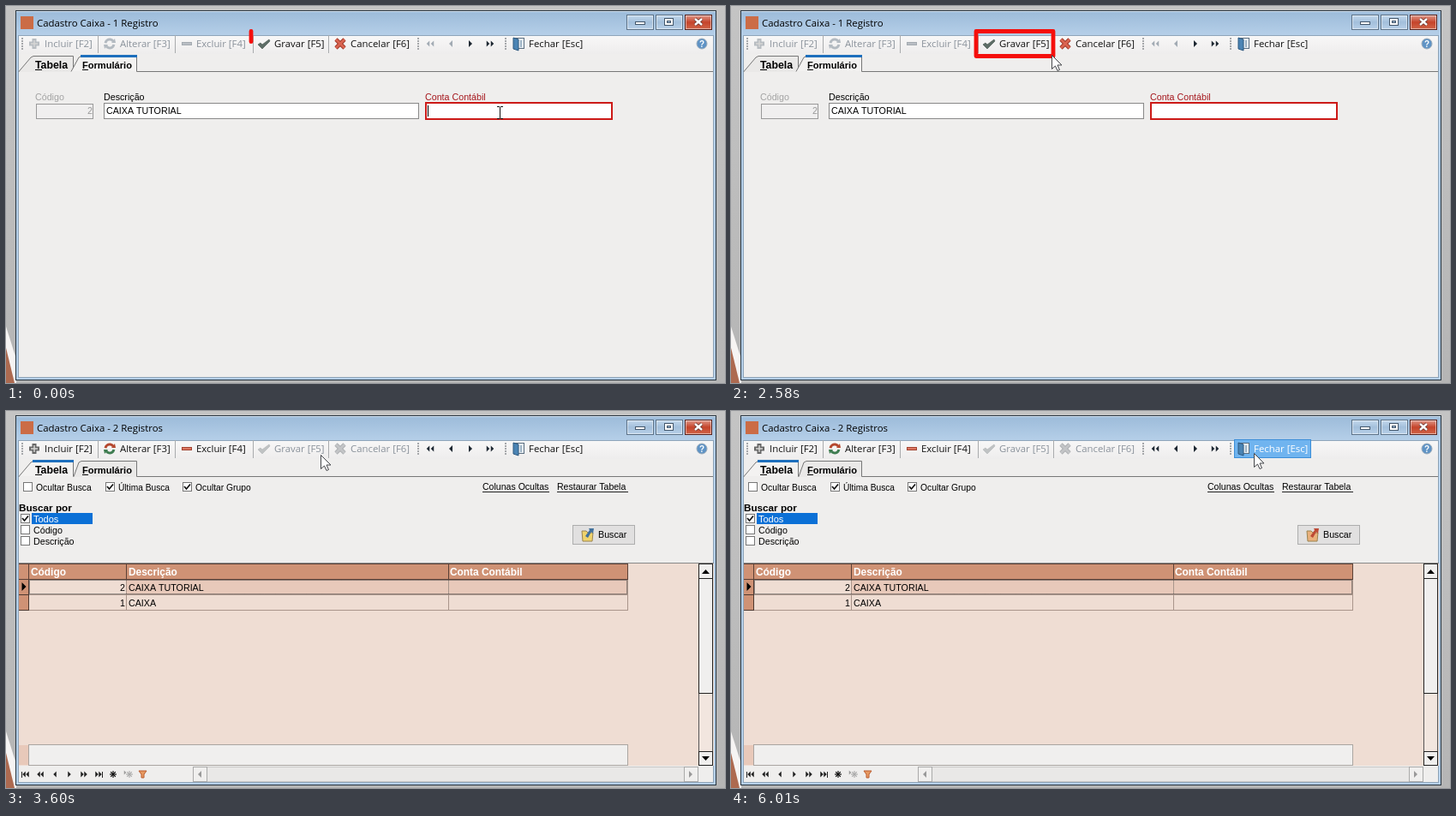
These frames come from a looping animation (839x440 px, 6210 ms). An HTML page with a canvas:

```html
<!DOCTYPE html>
<html lang="pt">
<head>
<meta charset="utf-8">
<title>Cadastro</title>
<style>
html, body { margin: 0; width: 100%; height: 100%; overflow: hidden; background: #bcbcbc; }
canvas { display: block; }
</style>
</head>
<body>
<canvas id="stage" width="839" height="440"></canvas>
<script>
const g = document.getElementById('stage').getContext('2d');
const LOOP = 6210;
const UI = '"Open Sans", sans-serif', SANS = '"Liberation Sans", Arial, sans-serif';
const PAGE = '#efeeed', INK = '#111', OFF = '#8a929b', RED = '#f50f0c', LINE = '#888';
const HEAD = '#cf9275', ROW = '#e8c9ba', PALE = '#efddd3';

// When each step of the demonstration happens, in ms
const T = { arrow: 1800, caretOff: 2440, press1: 3060, frame1Off: 3200, saved: 3390,
  grid: 3600, frame2: 3680, press2: 5730, frame2Off: 5870 };
const cursorPath = [[1730, 576, 124], [1870, 546, 115], [2290, 426, 74], [2580, 374, 57],
  [2790, 367, 51], [3750, 367, 51], [4570, 547, 42], [4930, 610, 49]];

function box(x, y, w, h, fill, stroke, line = 1) {
  if (fill) { g.fillStyle = fill; g.fillRect(x, y, w, h); }
  if (stroke) {
    g.strokeStyle = stroke; g.lineWidth = line;
    g.strokeRect(x + line / 2, y + line / 2, w - line, h - line);
  }
}
function shape(points, fill, stroke, line = 1, closed = true) {
  g.beginPath();
  points.forEach(([x, y]) => g.lineTo(x, y));
  if (closed) g.closePath();
  if (fill) { g.fillStyle = fill; g.fill(); }
  if (stroke) { g.strokeStyle = stroke; g.lineWidth = line; g.stroke(); }
}
const line = (points, color, width) => shape(points, null, color, width, false);
function disc(x, y, r, fill, stroke) {
  g.beginPath(); g.arc(x, y, r, 0, 7);
  g.fillStyle = fill; g.fill();
  if (stroke) { g.strokeStyle = stroke; g.lineWidth = 1; g.stroke(); }
}
function text(s, x, y, { color = '#000', size = 10.7, face = SANS, bold = false, align = 'left' } = {}) {
  g.font = `${bold ? 'bold ' : ''}${size}px ${face}`;
  g.textAlign = align; g.fillStyle = color;
  g.fillText(s, x, y);
}
function fade(y0, y1, ...colors) {
  const f = g.createLinearGradient(0, y0, 0, y1);
  colors.forEach((c, i) => f.addColorStop(i / (colors.length - 1), c));
  return f;
}
const tri = (x, y, dir, size, color) =>
  shape([[x - dir * size / 2, y - size], [x + dir * size / 2, y], [x - dir * size / 2, y + size]], color);

function cursorAt(t) {
  if (t <= cursorPath[0][0]) return cursorPath[0].slice(1);
  for (let i = 1; i < cursorPath.length; i++) {
    const [t0, x0, y0] = cursorPath[i - 1], [t1, x1, y1] = cursorPath[i];
    if (t < t1) {
      const k = (t - t0) / (t1 - t0);
      return [x0 + (x1 - x0) * k, y0 + (y1 - y0) * k];
    }
  }
  return cursorPath.at(-1).slice(1);
}

function drawWindow(saved) {
  box(0, 0, 839, 440, fade(0, 440, '#c4c4c4', '#b5b5b5'));
  shape([[0, 374], [12, 412], [12, 440], [0, 440]], '#f6f4f3');
  shape([[0, 399], [10, 440], [0, 440]], '#ad6a50');
  box(11, 5, 818, 432, fade(5, 34, '#9bbad9', '#b5cfe8'), '#27343f');
  box(12, 6, 816, 1, '#d5e5f4');
  box(14, 34, 812, 400, PAGE, '#8fa5ba');
  box(17, 12, 15, 15, '#cb6c46');
  text(`Cadastro Caixa - ${saved ? '2 Registros' : '1 Registro'}`, 36, 24, { face: UI, size: 11.4 });
  [[724, 32], [758, 32], [792, 32]].forEach(([x, w], i) => {
    const fill = i < 2 ? fade(10, 28, '#c8dcef', '#a3bfdb', '#bad2ea') : fade(10, 28, '#e3a294', '#c5442b', '#d2694c');
    box(x, 10, w, 18, fill, i < 2 ? '#5c7288' : '#5a221c');
    box(x + 1, 11, w - 2, 16, null, 'rgba(255,255,255,.5)');
  });
  box(734, 18, 12, 4, '#fff', '#44576b');
  box(768, 14, 11, 9, '#fff', '#44576b');
  box(771, 17, 5, 3, '#9db9d6', '#44576b');
  for (const [c, w] of [['#61302a', 4], ['#fff', 2.4]]) {
    line([[804, 15], [812, 22]], c, w);
    line([[812, 15], [804, 22]], c, w);
  }
}

const icons = {
  plus(x, y, on) {
    const c = on ? '#686868' : '#b7bcc1';
    line([[x - 6, y], [x + 6, y]], c, 5); line([[x, y - 6], [x, y + 6]], c, 5);
    line([[x - 4, y], [x + 4, y]], '#d6d6d4', 1.5); line([[x, y - 4], [x, y + 4]], '#d6d6d4', 1.5);
  },
  cycle(x, y, on) {
    for (const [a, c, d] of [[3.3, on ? '#b5482f' : '#b3bac1', 1], [0.2, on ? '#3f7d51' : '#b3bac1', -1]]) {
      g.beginPath(); g.arc(x, y, 5, a, a + 2.4);
      g.strokeStyle = c; g.lineWidth = 3; g.stroke();
      shape([[x + d * 2, y - d * 1], [x + d * 7, y - d * 1], [x + d * 6, y - d * 6]], c);
    }
  },
  minus(x, y, on) { box(x - 6, y - 2, 12, 4, on ? '#dc7762' : '#b9bec4', on ? '#a34431' : '#a5abb1'); },
  check(x, y, on) {
    shape([[x - 7, y + 1], [x - 4, y - 1], [x - 2, y + 1], [x + 6, y - 5], [x + 7, y - 3], [x - 2, y + 6]],
      on ? '#5d6d66' : '#bfc2c3', on ? '#48564f' : '#b4b7b9', .6);
  },
  cross(x, y, on) {
    for (const [c, w] of [[on ? '#a03a2b' : '#adb0b3', 4.6], [on ? '#db6450' : '#c3c5c7', 2.6]]) {
      line([[x - 5, y - 5], [x + 5, y + 5]], c, w);
      line([[x + 5, y - 5], [x - 5, y + 5]], c, w);
    }
  },
  door(x, y) {
    box(x - 6, y - 7, 13, 13, '#e7edf2', '#5b6e80');
    shape([[x - 6, y - 7], [x, y - 5], [x, y + 8], [x - 6, y + 6]], '#4b84b4', '#2d587f');
    box(x + 2, y - 4, 2, 8, '#9fb5c7');
  }
};
const buttons = [
  // label, icon, icon x, text x, left, right
  ['Incluir [F2]', 'plus', 33, 45, 24, 104], ['Alterar [F3]', 'cycle', 121, 133, 110, 194],
  ['Excluir [F4]', 'minus', 211, 222, 200, 285], ['Gravar [F5]', 'check', 301, 313, 290, 375],
  ['Cancelar [F6]', 'cross', 390, 402, 379, 475], ['Fechar [Esc]', 'door', 598, 610, 587, 677]
];
const arrows = [[495, -1, 2], [519, -1, 1], [542, 1, 1], [565, 1, 2]];

function drawToolbar(t, saved, [cx, cy]) {
  box(15, 35, 810, 21, fade(34, 56, '#f8f8f8', '#eeeded'));
  const hover = (l, r) => t > T.arrow && cy >= 33 && cy < 56 && cx >= l && cx < r;
  const glow = (l, r, pressed) =>
    box(l, 33, r - l, 22, pressed ? '#70b4ef' : '#b5d8f5', pressed ? '#3b8ed8' : '#5a9fd9');
  for (const x of [19, 481, 583])
    for (let y = 37; y < 52; y += 3) box(x - 1, y, 2, 2, '#a5a7aa');
  for (const x of [107, 197, 288, 376]) box(x, 34, 1, 21, '#a9abad');
  buttons.forEach(([label, icon, ix, tx, l, r], i) => {
    const on = i === 5 || (i < 3) === saved;
    const lit = on && hover(l, r);
    const pressed = lit && t >= (i === 5 ? T.press2 : T.press1);
    if (lit) glow(l, r, pressed);
    icons[icon](ix, 44, on);
    text(label, tx, 48, { face: UI, size: 11.4, color: pressed ? '#fff' : on ? INK : OFF });
  });
  arrows.forEach(([x, dir, count], i) => {
    const on = i > 1 || t >= T.grid;
    if (on && hover(x - 11, x + 12)) glow(x - 11, x + 12);
    for (let k = 0; k < count; k++)
      tri(x + (count > 1 ? k * 5 - 2.5 : 0), 44, dir, count > 1 ? 3.5 : 4, on ? '#1c2630' : '#a2abb4');
  });
  disc(812, 44, 6, '#5f93c5', '#9aabba');
  text('?', 812, 48, { bold: true, size: 10, color: '#fff', align: 'center' });
}

function drawTabs(table) {
  line([[15, 76.5], [825, 76.5]], '#777', 1);
  const tab = (x0, x1, x2, active) => {
    const edge = [[x0, 77], [x1 - 3, 60], [x1, 58.5], [x2 + .5, 58.5], [x2 + .5, 77]];
    shape(edge, active ? '#f3f2f1' : '#eae9e8');
    line(edge.map(([x, y]) => [x, Math.min(y, 76.5)]), '#777', 1);
    if (active) {
      box(x0 + 1, 76, x2 - x0 - 1, 1, PAGE);
      box(x1 - 1, 57, x2 - x1 + 2, 3, '#1d6fbd');
    }
  };
  const first = () => tab(15, 32, 78, table), second = () => tab(table ? 79 : 76, 88, 152, !table);
  table ? (second(), first()) : (first(), second());
  text('Tabela', 34, 73, { bold: true, size: 12.3 });
  text('Formulário', 89, 73, { bold: true, size: 11.1 });
  box(34, 74, 8, 1, '#000');
  box(89, 74, 7, 1, '#000');
}

function drawForm(t) {
  text('Código', 34, 110, { color: '#a3a3a3' });
  box(35, 114, 67, 18, '#f0efef', '#999');
  text('2', 101, 126, { color: '#999', align: 'right' });
  text('Descrição', 114, 110);
  box(114, 113, 368, 19, '#fff', LINE);
  text('CAIXA TUTORIAL', 117, 126);
  text('Conta Contábil', 489, 110, { color: '#a5161c' });
  box(489, 112, 219, 21, '#fff', '#cc1a17', 2);
  if (t < T.caretOff) box(492, 116, 1, 13, '#000');
}

function checkbox(label, x, y, checked, size = 10.7, color) {
  box(x, y, 11, 11, '#fff', '#777');
  if (checked) line([[x + 2, y + 5], [x + 4.5, y + 8], [x + 9, y + 2.5]], '#111', 1.7);
  text(label, x + 15, y + 10, { size, color });
}
function link(label, x, width) {
  text(label, x, 92, { size: 10.55 });
  box(x, 94, width, 1, '#222');
}
function drawSearch(t) {
  checkbox('Ocultar Busca', 20, 83, false, 10.3);
  checkbox('Última Busca', 116, 83, true, 10.2);
  checkbox('Ocultar Grupo', 206, 83, true, 10.3);
  link('Colunas Ocultas', 556, 78);
  link('Restaurar Tabela', 643, 83);
  text('Buscar por', 15, 117, { bold: true, size: 11.7 });
  box(30, 119, 71, 13, '#0b70d6');
  checkbox('Todos', 17, 120, true, 11, '#fff');
  checkbox('Código', 17, 133);
  checkbox('Descrição', 17, 146);
  box(661, 133, 73, 23, '#e1e0e0', '#adadad');
  const warm = t > 3750;
  shape([[672, 140], [677, 140], [679, 142], [685, 142], [684, 152], [673, 152]], warm ? '#e9b07c' : '#efd36c', '#9a8450');
  shape([[676, 146], [681, 139], [680, 137], [686, 137], [685, 143], [683, 141], [679, 148]], warm ? '#bd4a35' : '#41719c');
  text('Buscar', 691, 148);
  box(15, 177, 811, 1, LINE);
}

function drawGrid() {
  box(15, 178, 811, 236, PALE);
  box(15, 179, 711, 17, HEAD);
  box(15, 197, 12, 35, HEAD);
  box(140, 197, 585, 17, ROW);
  box(15, 178, 711, 1, '#5b4036');
  box(15, 196, 711, 1, '#5b4036');
  for (const x of [26, 140, 516, 725]) {
    box(x, 179, 1, 18, '#5b4036');
    box(x, 197, 1, 36, '#a9958b');
  }
  for (const y of [214, 232]) {
    box(27, y, 699, 1, '#a9958b');
    box(15, y, 12, 1, '#4c3830');
  }
  box(26, 197, 1, 36, '#4c3830');
  g.setLineDash([1, 1]);
  box(27, 197, 698, 17, null, '#333');
  g.setLineDash([]);
  const head = { bold: true, size: 11.9, color: '#fff' };
  text('Código', 29, 192, head);
  text('Descrição', 143, 192, head);
  text('Conta Contábil', 518, 192, head);
  tri(21, 205, 1, 5, '#000');
  [['2', 'CAIXA TUTORIAL', 210], ['1', 'CAIXA', 228]].forEach(([code, name, y]) => {
    text(code, 139, y, { align: 'right' });
    text(name, 143, y);
  });

  box(15, 390, 12, 23, ROW);
  box(26, 389, 700, 25, '#f0efee', '#aaa5a1');

  box(808, 178, 17, 236, '#f2e6df', '#555');
  box(808, 178, 17, 18, '#f0efee', '#222');
  box(808, 195, 17, 135, '#f0efee', '#222');
  box(808, 397, 17, 17, '#f0efee', '#222');
  shape([[812, 190], [816.5, 185], [821, 190]], '#000');
  shape([[812, 403], [821, 403], [816.5, 408]], '#000');

  box(15, 414, 810, 19, PAGE);
  const ink = '#222';
  for (const [x, dir, count] of [[23, -1, 2], [40, -1, 2], [57, -1, 1], [74, 1, 1], [91, 1, 2], [108, 1, 2]])
    for (let k = 0; k < count; k++) tri(x + (count > 1 ? k * 4 - 2 : 0), 424, dir, 3.5, ink);
  box(18, 421, 1, 7, ink);
  box(112, 421, 1, 7, ink);
  const star = (x, c) => [0, 1, 2, 3].forEach(i => {
    const a = i * Math.PI / 4, dx = 4 * Math.cos(a), dy = 4 * Math.sin(a);
    line([[x - dx, 424 - dy], [x + dx, 424 + dy]], c, 1.1);
  });
  star(125, '#000');
  star(144, '#aaa');
  tri(139, 422, 1, 2.5, '#999');
  shape([[155, 420], [164, 420], [161, 424], [161, 428], [158, 428], [158, 424]], '#e79a62', '#bb5a2c');
  box(218, 415, 590, 18, '#e9e8e7', '#c9c8c7');
  box(218, 415, 17, 18, '#f0efee', '#aaa');
  box(791, 415, 17, 18, '#f0efee', '#aaa');
  tri(226, 424, -1, 4, '#999');
  tri(799, 424, 1, 4, '#999');
}

// Red frame drawn from the top left corner: down, right, up and back
function drawFrame(x, y, w, h, length) {
  g.lineJoin = g.lineCap = 'round';
  g.setLineDash([Math.max(0, length), 999]);
  shape([[x, y], [x, y + h], [x + w, y + h], [x + w, y]], null, RED, 4.8);
  g.setLineDash([]);
  g.lineJoin = 'miter';
  g.lineCap = 'butt';
}

function drawCursor(t, [x, y]) {
  if (t < T.arrow) {
    box(x, y - 6, 1, 13, '#111');
    for (const dy of [-7, 7]) {
      box(x - 3, y + dy, 3, 1, '#111');
      box(x + 1, y + dy, 3, 1, '#111');
    }
    return;
  }
  const outline = [[0, 0], [0, 16], [4, 12.5], [6.5, 18], [9, 17], [6.5, 11.5], [11.5, 11.5]];
  shape(outline.map(([dx, dy]) => [x + dx + .5, y + dy + .5]), '#fff', '#45474b', 1);
}

function draw(t) {
  const saved = t >= T.saved, cursor = cursorAt(t);
  drawWindow(saved);
  drawToolbar(t, saved, cursor);
  drawTabs(saved);
  if (saved) drawSearch(t); else drawForm(t);
  if (t >= T.grid) drawGrid();
  if (t < T.frame1Off) drawFrame(286, 29.5, 90, 29, 12 + .212 * t);
  if (t >= T.frame2 && t < T.frame2Off) drawFrame(583.5, 30, 97, 29, .225 * (t - 3650));
  drawCursor(t, cursor);
}

const start = performance.now();
function tick() {
  draw((performance.now() - start) % LOOP);
  requestAnimationFrame(tick);
}
tick();
</script>
</body>
</html>
```
